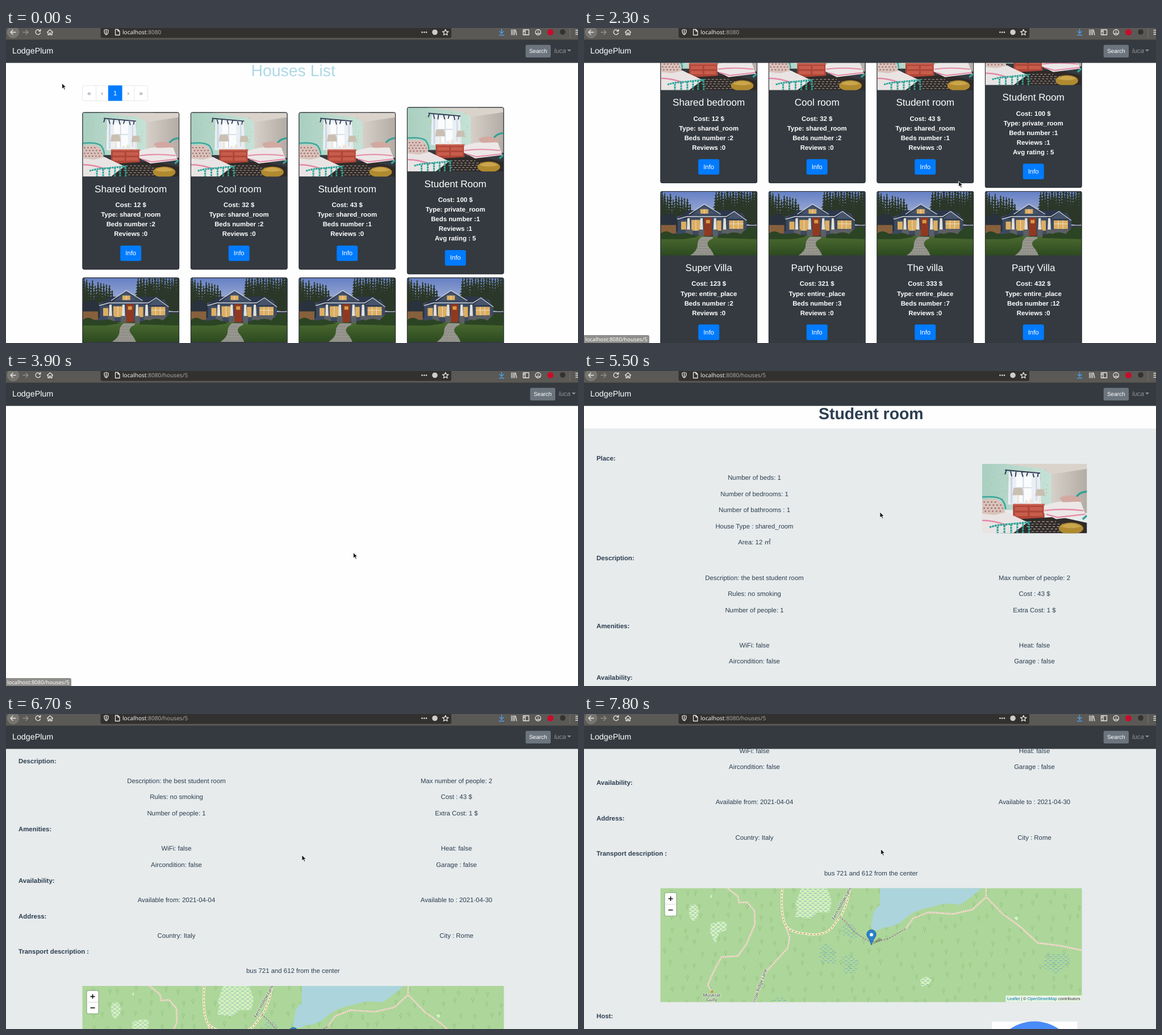
An HTML page that plays this animation: 1007x556 px, repeating every 8000 ms.

```html
<!DOCTYPE html>
<html lang="en">
<head>
<meta charset="utf-8">
<title>House listing</title>
<style>
  html, body { margin: 0; width: 100%; height: 100%; overflow: hidden; background: #fefefe; }
  svg { display: block; }
  text { font: 11.4px "Liberation Sans", "Noto Sans CJK JP", sans-serif; fill: #fff; white-space: pre; text-rendering: geometricPrecision; }
  .mid { text-anchor: middle; }
  .bold { font-weight: bold; }
  .h1 { font-size: 28.4px; }
  .h4 { font-size: 17.1px; }
  .ink { fill: #2c3e50; }
  .pale { fill: #add8e6; }
  .mute { fill: #6c757d; }
  .brand { font-size: 14.28px; }
  .small { font-size: 10px; }
  .user { font-style: italic; fill: #8f9397; }
  .url { font: 10.05px "Noto Sans", sans-serif; fill: #f2f1ef; }
  .tip { font: 9.55px "Noto Sans", sans-serif; }
  .dim { fill: #aaa8a4; }
  .place { font: 8px "Noto Sans", sans-serif; fill: #444; stroke: #e6f3de; stroke-width: 1.5px; paint-order: stroke; }
  .credit { font-size: 7.4px; fill: #333; }
  .line { fill: none; stroke: #e8e6e3; stroke-width: 1.3; stroke-linecap: round; stroke-linejoin: round; }
  .trail { fill: none; stroke: #f3e6d6; stroke-width: 2.4; stroke-linejoin: round; }
  .dots { fill: none; stroke: #e0a79b; stroke-width: 1.2; stroke-dasharray: 2 2; stroke-linejoin: round; }
</style>
</head>
<body>
<svg id="stage" width="1007" height="556" viewBox="0 0 1007 556">
  <defs>
    <linearGradient id="mint"><stop stop-color="#a9cfc0"/><stop offset="1" stop-color="#c9e4da"/></linearGradient>
    <linearGradient id="plaster"><stop stop-color="#d6d0c9"/><stop offset="1" stop-color="#b3aca5"/></linearGradient>
    <linearGradient id="sky" x2="0" y2="1"><stop stop-color="#6580c4"/><stop offset="1" stop-color="#b9c1dd"/></linearGradient>
    <linearGradient id="lawn" x2="0" y2="1"><stop stop-color="#4c6b31"/><stop offset="1" stop-color="#2c4a1f"/></linearGradient>
    <symbol id="room" viewBox="0 0 170 113" preserveAspectRatio="none">
      <path fill="url(#mint)" d="M0 0H125V75H0z"/>
      <path fill="url(#plaster)" d="M112 16L170 6V80H112z"/>
      <path fill="#d9d3cb" d="M36 0H170V8L112 17L98 8z"/>
      <path id="wallDots" fill="#c9b474"/>
      <path fill="#e9eff4" d="M43 13H93L96 66H42z"/>
      <path fill="#fafbfc" d="M55 18H80V62H55z"/>
      <path fill="#ccd8e1" d="M66 18H67.500V62H66zM55 38H80V39.500H55zM46 20H49V64H46zM87 20H89V60H87z"/>
      <path fill="none" stroke="#303a52" stroke-width="1.8" d="M37 10L94 15M39 11l-2 6M46 12l2 8M55 12l-1 9M64 13l2 8M74 13l-2 7M82 14l2 8M91 14l-1 7"/>
      <path fill="#ae4538" d="M50 66H101V94H50z"/>
      <path fill="#c85d4c" d="M50 65H101V68H50zM53 70H74V76H53zM77 70H98V76H77zM53 79H74V85H53zM77 79H98V85H77z"/>
      <path fill="#c9bfb2" d="M51 39H65L67 51H49zM88 41H100L102 52H86z"/>
      <path fill="#eee6dc" d="M56 51H60V65H56zM92 52H95V65H92zM70 59h4v6h-4zM77 57h6v8h-6z"/>
      <path fill="#302b29" d="M28 95L60 90L125 86L170 96V113H28z"/>
      <path fill="none" stroke="#b3aaa1" stroke-width="1.1" stroke-dasharray="4 3" d="M62 94H120M66 98H132M72 102H128M76 106H126M80 110H126"/>
      <path fill="none" stroke="#35a196" stroke-width="3.4" d="M152 56Q156 46 170 45M163 90L170 84"/>
      <path fill="#ece8e7" d="M100 68Q128 57 160 62L168 84L120 90L100 80z"/>
      <path fill="#d2a9a1" d="M126 55q16-7 30-1l8 6q-18 3-34 2z"/>
      <path fill="none" stroke="#e58aa8" stroke-width="2.2" d="M101 76Q130 72 164 76M104 82L122 87L167 82"/>
      <path fill="none" stroke="#3aa79b" stroke-width="2.4" d="M0 54Q24 52 32 58Q38 66 38 74"/>
      <path fill="#e9e4e3" d="M0 78Q30 72 46 82L74 95L50 113H0z"/>
      <path fill="#d8c3bb" d="M0 58L24 57L34 65L37 79L20 83L0 81z"/>
      <path fill="none" stroke="#a4656a" stroke-width="2" stroke-dasharray="2.5 3.500" d="M2 62H26M5 67H33M2 72H34M4 77H34"/>
      <path fill="none" stroke="#e388a8" stroke-width="2.4" d="M0 92Q20 92 40 100"/>
      <path fill="none" stroke="#2ba499" stroke-width="3" stroke-dasharray="3.4 1" d="M12 103Q25 99 45 98L76 95V113M57 97V113M66 96V113M47 98V113M36 100V113M25 102V113"/>
      <ellipse cx="144" cy="105" rx="20" ry="9.500" fill="#b08a30"/>
      <path fill="#cba64c" d="M127 102Q144 92 161 102Q144 107 127 102z"/>
    </symbol>
    <symbol id="house" viewBox="0 0 170 113" preserveAspectRatio="none">
      <path fill="url(#sky)" d="M0 0H170V60H0z"/>
      <path id="firs" fill="#2b3728"/>
      <path fill="#3c4a61" d="M28 44L52 38L77 23L104 38H144L152 50V76H28z"/>
      <path fill="#2c374b" d="M30 47L50 33H64L46 49zM98 33H134L153 50H112z"/>
      <path fill="#46546c" d="M116 48L130 36L146 48zM58 39L77 26L96 39z"/>
      <path fill="none" stroke="#cfd2d8" stroke-width="1.4" d="M50 40L77 22L106 40M28 49L46 44H116L130 35L152 51"/>
      <path fill="#29323d" d="M0 44L20 38L30 50V70H0z"/>
      <path fill="#dcae62" d="M70 31H84V39H70zM36 53H45V67H36zM54 50H70V69H54zM121 51H146V66H121zM99 51H107V69H99z"/>
      <path fill="none" stroke="#eadfc6" stroke-width="1" d="M77 31V39M129 51V66M137 51V66M121 57H146M62 50V69"/>
      <path fill="#92381f" d="M77 46H90V78H77z"/>
      <path fill="#d99a48" d="M80 50H87V56H80z"/>
      <path fill="#e2dfd9" d="M47 47H51L52 70H46zM70 47H74L75 70H69zM94 47H98L99 70H93zM111 47H115L116 70H110z"/>
      <path fill="#5c5f64" d="M44 67H56V80H44zM67 67H77V80H67zM92 67H101V80H92zM108 67H150V79H108z"/>
      <path fill="#87603c" d="M0 59H27V74H0z"/>
      <path fill="url(#lawn)" d="M0 80Q40 76 85 79T170 78V113H0z"/>
      <path fill="#2b4423" d="M0 74Q10 66 22 76L46 73L66 80L40 84H0zM100 82Q108 71 118 75Q130 69 142 75Q156 58 170 64V84z"/>
      <path fill="#97968f" d="M72 80H92V83Q78 88 85 98Q92 106 94 113H52Q66 103 65 93Q65 86 72 80z"/>
      <path fill="none" stroke="#77766f" stroke-width=".8" stroke-dasharray="3 1.5" d="M70 86H84M67 91H82M67 96H84M64 101H88M60 106H91M56 110H93"/>
    </symbol>
    <pattern id="marsh" width="9" height="7" patternUnits="userSpaceOnUse">
      <path stroke="#6cacc4" stroke-width=".9" d="M0 1.5H5M5 5H9"/>
    </pattern>
  </defs>
  <g id="list"></g>
  <g id="detail"></g>
  <g id="chrome"></g>
  <g id="status">
    <path fill="#8f8e8b" d="M0 542H112Q115 542 115 545V556H0z"/>
    <text class="tip" x="2" y="552.5">localhost:8080/houses/5</text>
  </g>
  <g id="cursor">
    <path id="arrow" fill="#1b1b1b" stroke="#fff" stroke-width=".9" d="M.4 .4V10.6L2.9 8.4L4.6 12.2L6.4 11.4L4.7 7.7H8z"/>
    <path id="hand" fill="#fff" stroke="#111" stroke-width=".9" d="M2 0Q3.6-.6 3.8 1V5L8.5 6Q9.6 6.4 9.3 8L8.4 13H2.8L-1 8.4Q-1 6.8 .4 7L2 8z"/>
  </g>
</svg>
<script>
const $ = id => document.getElementById(id);
const text = (x, y, s, cls = '', attrs = '') => `<text x="${x}" y="${y}" class="${cls}" ${attrs}>${s}</text>`;
const mid = (x, y, s, cls = '') => text(x, y, s, 'mid ' + cls);
const rect = (x, y, w, h, fill, attrs = '') => `<rect x="${x}" y="${y}" width="${w}" height="${h}" fill="${fill}" ${attrs}/>`;
const path = (d, attrs) => `<path d="${d}" ${attrs}/>`;
const photo = (id, x, y, w, h) => `<use href="#${id}" x="${x}" y="${y}" width="${w}" height="${h}"/>`;

let seed = 7;
const rand = () => (seed = seed * 16807 % 2147483647) / 2147483647;

// A ragged fir: narrow crown, wider skirts
function fir(x, top) {
  let left = '', right = '';
  for (let y = top + 4, w = 1; y < 58; y += 5, w += .45) {
    left += `L${x - w * (1 + rand())} ${y}L${x - w * .5} ${y + 1}`;
    right = `L${x + w * .5} ${y + 1}L${x + w * (1 + rand())} ${y}` + right;
  }
  return `M${x} ${top}${left}${right}z`;
}
let spots = '', firs = '';
for (let i = 0; i < 30; i++) spots += `M${rand() * 112} ${6 + rand() * 50}h1.3v1.5h-1.3z`;
for (let x = 2; x < 54; x += 5) firs += fir(x, x * .35 + rand() * 12 - 6);
for (let x = 98; x < 172; x += 5) firs += fir(x, rand() * 14 - 12);
$('wallDots').setAttribute('d', spots);
$('firs').setAttribute('d', firs);

// Listing page
function card(col, top, pic, [name, cost, type, beds, rating]) {
  const x = 134.5 + col * 190.5, cx = x + 85.2;
  const lines = [`Cost: ${cost} $`, `Type: ${type}`, `Beds number :${beds}`, `Reviews :${rating ? 1 : 0}`];
  if (rating) lines.push(`Avg rating : ${rating}`);
  const by = top + 167.2 + lines.length * 17.1;
  return rect(x, top, 170.5, by - top + 42, '#343a40', 'rx="3"')
    + photo(pic, x + .7, top + .7, 169.1, 112.8)
    + rect(x + .3, top + .3, 169.9, by - top + 41.4, 'none', 'rx="3" stroke="#24282c" stroke-width=".8"')
    + mid(cx, top + 141.2, name, 'h4')
    + lines.map((s, i) => mid(cx, top + 167.3 + i * 17.1, s, 'bold')).join('')
    + rect(cx - 18.5, by - .4, 37, 27.4, '#007bff', `rx="3" ${name === 'Student room' ? 'id="info"' : ''}`)
    + mid(cx, by + 16.8, 'Info');
}
const rooms = [['Shared bedroom', 12, 'shared_room', 2], ['Cool room', 32, 'shared_room', 2],
  ['Student room', 43, 'shared_room', 1], ['Student Room', 100, 'private_room', 1, 5]];
const villas = [['Super Villa', 123, 'entire_place', 2], ['Party house', 321, 'entire_place', 3],
  ['The villa', 333, 'entire_place', 7], ['Party Villa', 432, 'entire_place', 12]];
const pageEdges = [134.5, 158.5, 180, 204.5, 226, 249.5];

$('list').innerHTML = mid(505.7, 85, 'Houses List', 'h1 pale')
  + rect(134.5, 101.7, 115, 26.6, '#fff', 'rx="3" stroke="#dee2e6" stroke-width=".8"')
  + pageEdges.slice(1, 5).map(x => rect(x - .4, 101.7, .8, 26.6, '#dee2e6')).join('')
  + rect(180, 101.4, 24.5, 27.2, '#007bff')
  + [...'«‹1›»'].map((s, i) => mid((pageEdges[i] + pageEdges[i + 1]) / 2, 118.5, s, s === '1' ? '' : 'mute')).join('')
  + rooms.map((r, i) => card(i, i === 3 ? 139.7 : 148.7, 'room', r)).join('')
  + villas.map((r, i) => card(i, 440.6, 'house', r)).join('');

// Map, drawn at its final scroll position
function map() {
  let trees = '';
  for (let y = 316; y < 508; y += 21)
    for (let x = 140; x < 875; x += 27) {
      const tx = x + rand() * 16, ty = y + rand() * 11;
      trees += `M${tx} ${ty}v-4m0 0a2.2 2.4 0 1 1 .1 0`;
    }
  const trail = d => path(d, 'class="trail"') + path(d, 'class="dots"');
  const marsh = (d, base) => path(d, `fill="${base || 'none'}"`) + path(d, 'fill="url(#marsh)"');
  const meadow = '#d3efb8';
  const road = 'M349 307Q346 345 352 366Q358 385 385 387Q420 394 435 379L452 357Q464 336 469 307';
  return '<clipPath id="mapBox">' + rect(134.5, 307.5, 742, 201, '#000') + '</clipPath><g clip-path="url(#mapBox)">'
    + rect(134, 307, 743, 202, '#add69a')
    + path(trees, 'fill="none" stroke="#8bbd79" stroke-width=".8"')
    + marsh('M382 307H428L436 330L432 350L412 350L398 361L372 358L376 340L372 338z', meadow)
    + marsh('M187 338Q196 331 202 345Q202 362 192 366Q181 355 187 338z', meadow)
    + marsh('M223 371Q238 364 252 368L250 382L238 386L231 406L222 385z', meadow)
    + marsh('M592 469L603 463L612 469L608 477L594 481z', meadow)
    + path('M221 321l5-4v7l-4 2zM756 359l6-3 4 5-5 4z', `fill="${meadow}" stroke="#8cc6a0" stroke-width=".7"`)
    + marsh('M416 408L431 406L444 420V442H420L414 428z')
    + marsh('M454 428L470 424L485 436L478 457L458 458z')
    + marsh('M455 370L472 371L484 386L478 398L456 390z')
    + marsh('M812 424L852 422L857 440L832 460L807 447z')
    + marsh('M333 503L350 498L360 508H334z')
    + path('M521 307V337Q509 345 508 361L505 377Q514 387 526 377Q546 377 562 364Q580 346 611 341Q638 331 661 337Q680 326 700 307z', 'fill="#abd4dc"')
    + trail('M252 307L271 322L273 333L287 332L300 347L301 371L286 406L271 427L242 429L228 455L218 478L223 488')
    + trail('M355 375L362 394L358 414L336 438L315 461L298 510')
    + trail('M566 380L579 361L606 350L650 353L684 345L708 323V307M708 323L738 354L765 373L799 404L838 409L877 417')
    + path(road, 'fill="none" stroke="#f7f5d7" stroke-width="3.6"')
    + path(road, 'fill="none" stroke="#a78f4c" stroke-width="1.2" stroke-dasharray="4 2"')
    + path('M450 358L463 369L477 386L505 403L535 397L568 378', 'fill="none" stroke="#a46fa2" stroke-width="1.4" stroke-dasharray="3 2"')
    + text(0, 0, 'Fern Hollow Lane We', 'place', 'transform="translate(441 364) rotate(-62)"')
    + text(0, 0, 'arrow Ridge Lane', 'place', 'transform="translate(300 513) rotate(-70)"')
    + path('M222.5 492l3-5 3 5z', 'fill="#d08f30"')
    + mid(225, 499, 'Muskrat', 'place') + mid(225, 507, 'Gully', 'place')
    + path('M507 407l12-12q6 0 5 5z', 'fill="#333" opacity=".3"')
    + path('M506 408Q503 398 499 393.5A8.3 8.3 0 1 1 513 393.5Q509 398 506 408z', 'fill="#2a81cb" stroke="#1f6296" stroke-width=".7"')
    + '<circle cx="506" cy="389.5" r="3" fill="#fff"/>'
    + rect(142, 315.5, 21, 41, '#fff', 'rx="2.5" stroke="#8fac85" stroke-width="1.2"')
    + rect(142, 335.5, 21, .8, '#ccc')
    + path('M148.5 326h8M152.5 322v8M148.5 346h8', 'stroke="#111" stroke-width="1.6"')
    + rect(742.5, 497, 135, 12, '#fff', 'opacity=".75"')
    + text(745, 505.3, '<tspan fill="#0078a8">Leaflet</tspan> | © <tspan fill="#0078a8">OpenStreetMap</tspan> contributors', 'credit')
    + '</g>';
}

// Detail page
const headings = [['Place:', 153.7], ['Description:', 330.2], ['Amenities:', 449.5], ['Availability:', 540.5],
  ['Address:', 603.3], ['Transport description :', 665.5], ['Host:', 952]];
const facts = [
  [300, 188, 'Number of beds: 1', 'Number of bedrooms: 1', 'Number of bathrooms : 1', 'House Type : shared_room', 'Area: 12 ㎡'],
  [300, 364.7, 'Description: the best student room', 'Rules: no smoking', 'Number of people: 1'],
  [793, 364.7, 'Max number of people: 2', 'Cost : 43 $', 'Extra Cost: 1 $'],
  [300, 483.9, 'WiFi: false', 'Aircondition: false'],
  [793, 483.9, 'Heat: false', 'Garage : false'],
  [300, 574.7, 'Available from: 2021-04-04'], [793, 574.7, 'Available to : 2021-04-30'],
  [300, 637.6, 'Country: Italy'], [793, 637.6, 'City : Rome'],
  [505.3, 700, 'bus 721 and 612 from the center']
];
$('detail').innerHTML = mid(505.3, 85, 'Student room', 'h1 bold ink')
  + rect(0, 101.5, 1007, 1100, '#e7ebec')
  + headings.map(([s, y]) => text(22, y + 4, s, 'bold ink')).join('')
  + facts.map(([x, y, ...rows]) => rows.map((s, i) => mid(x, y + 4 + i * 28.5, s, 'ink')).join('')).join('')
  + photo('room', 701, 164, 184.5, 122.5)
  + `<g transform="translate(0 419.3)">${map()}`
  + rect(718, 543, 150.5, 150, '#fefefe') + '<circle cx="793" cy="618" r="75.5" fill="#4a8cf7"/></g>';

// Browser toolbar and navigation bar
const icon = (d, attrs = '') => path(d, `class="line" ${attrs}`);
$('chrome').innerHTML = rect(0, 0, 1007, 21, '#5b5955')
  + rect(166.5, -5, 617.5, 22.5, '#33312f', 'rx="3"')
  + '<circle cx="12.5" cy="7.5" r="10" fill="#76746f" stroke="#8b8985" stroke-width=".8"/>'
  + icon('M17 7.5H8M12 3.5L8 7.5L12 11.5')
  + icon('M30 7.5H39M35 3.5L39 7.5L35 11.5', 'style="stroke:#94928e"')
  + icon('M60 5A4.3 4.3 0 1 0 60.5 8.5M60.8 2.5V5.5H57.8')
  + icon('M72.5 7.5L77.5 3L82.5 7.5M74 7V12H76.5V9H78.5V12H81V7')
  + icon('M173 3.5L176.5 2.5L180 3.5Q180.5 10 176.5 12Q172.5 10 173 3.5M176.5 4.5V10')
  + rect(186.5, 0, .8, 17, '#45433f')
  + icon('M192.5 2.5H197L200 5.5V12.5H192.5zM197 3V5.5H200')
  + text(205, 11.3, 'localhost<tspan class="dim" id="path"></tspan>', 'url')
  + [732.5, 736.3, 740].map(x => `<circle cx="${x}" cy="7.5" r="1.3" fill="#e8e6e3"/>`).join('')
  + '<circle cx="755" cy="7.5" r="4.8" fill="#cfcdca"/>'
  + icon('M773.7 2.5L775.2 6L779 6.3L776.1 8.8L777 12.5L773.7 10.5L770.4 12.5L771.3 8.8L768.4 6.3L772.2 6z')
  + icon('M872.5 2V9M869 6L872.5 9.5L876 6M868.5 12.5H876.5', 'style="stroke:#4aa3f5"')
  + icon('M890 3V12M892.7 3V12M895.4 3V12M897 3.5L899 12')
  + icon('M910.5 3H920.5V12H910.5zM914 3V12M911.5 6H913')
  + icon('M941.5 7.5A4.7 4.7 0 1 1 932 7.5A4.7 4.7 0 1 1 941.5 7.5M934 10.5Q937 7.5 940 10.5M936.8 5.5V6')
  + '<circle cx="958.5" cy="7.5" r="5.5" fill="#c70d2c"/><circle cx="980" cy="7" r="4.8" fill="#34312f"/>'
  + rect(992.5, 0, .8, 18, '#7c7a76')
  + icon('M1003 4H1009M1003 7.5H1009M1003 11H1009')
  + rect(0, 21, 1007, 40.6, '#343a40') + rect(0, 20.5, 1007, .8, '#3c3b39')
  + text(11, 45, 'LodgePlum', 'brand')
  + '<g id="menu">' + rect(914.7, 29.7, 44.3, 22.3, '#6c757d', 'rx="2.5"')
  + mid(936.8, 43.8, 'Search', 'small')
  + text(965, 44.2, 'luca', 'user')
  + path('M988 38h7l-3.5 3.6z', 'fill="#8f9397"') + '</g>';

// Tracks: [time, value...], each value holds until the next entry
const listScroll = [[0, 0], [2000, 25], [2100, 76.2], [2200, 125], [2300, 152.5], [2900, 108], [3000, 76.2]];
const detailScroll = [[0, 0], [5600, 40], [5700, 72], [5900, 76.2], [6200, 112], [6300, 190], [6400, 228.8],
  [6700, 246.7], [6800, 251], [7000, 252.5], [7500, 285], [7600, 345], [7700, 395], [7800, 419.3]];
const pointer = [[0, 98, 97], [400, 378, 252], [600, 226, 174], [700, 558, 334], [900, 568, 350], [1000, 577, 365],
  [1100, 585, 379], [1200, 591, 388], [1300, 595, 393], [1400, 598, 396], [1500, 600, 397],
  [2000, 613, 372], [2100, 634, 331], [2200, 651, 292], [2300, 659, 270], [2400, 658, 275], [2500, 656, 280],
  [2600, 653, 286], [2700, 650, 292], [2800, 647, 297], [3200, 629, 320], [3300, 617, 320], [3400, 612, 320],
  [3900, 611, 320], [4000, 773, 315], [4100, 735, 304], [4200, 675, 287], [4300, 605, 267], [4400, 548, 252],
  [4500, 520.5, 248.5], [7600, 521, 244], [7800, 522, 238]];
const LOOP = 8000;

const at = (track, t) => track.filter(k => k[0] <= t).pop().slice(1);
const within = (t, from, to) => t >= from && t < to;
const show = (id, on) => $(id).setAttribute('visibility', on ? 'visible' : 'hidden');
const move = (id, x, y) => $(id).setAttribute('transform', `translate(${x} ${y})`);

function draw(now) {
  const t = now % LOOP;
  const blank = within(t, 3900, 4000);
  const hover = within(t, 1200, 2000) || within(t, 3300, 3900);
  show('list', t < 3900);
  show('detail', t >= 4000);
  show('status', within(t, 1200, 2500) || within(t, 3300, 4000));
  show('arrow', !hover);
  show('hand', hover);
  move('list', 0, -at(listScroll, t)[0]);
  move('detail', 0, -at(detailScroll, t)[0]);
  move('menu', blank ? 8 : 0, 0);
  move('cursor', ...at(pointer, t));
  $('info').setAttribute('fill', hover ? '#0069d9' : '#007bff');
  $('path').textContent = t < 3900 ? ':8080' : ':8080/houses/5';
}

const start = performance.now();
function tick() {
  draw(performance.now() - start);
  requestAnimationFrame(tick);
}
tick();
</script>
</body>
</html>
```
